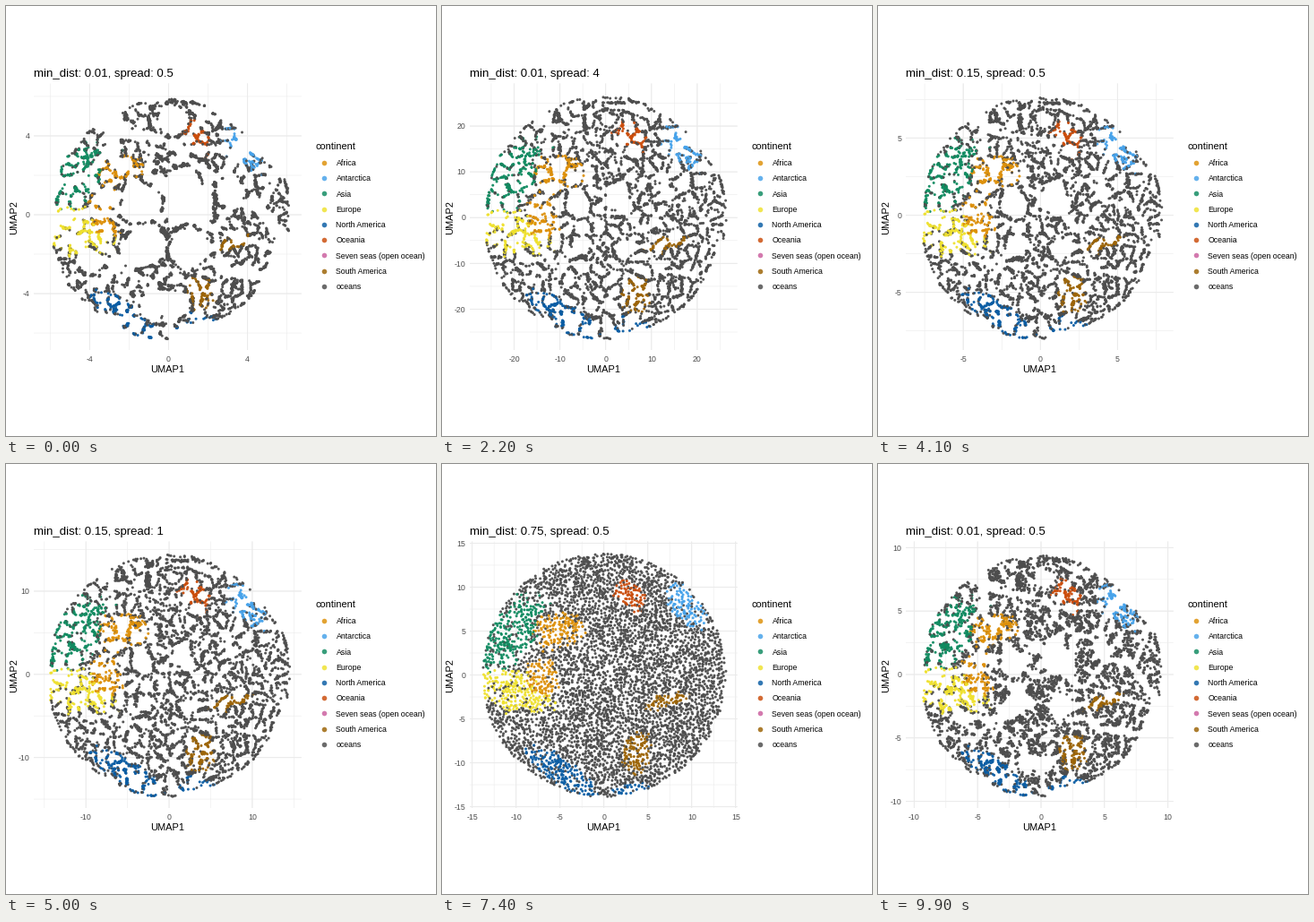
A matplotlib script that plays this animation: 480x480 px, repeating every 10 s.

```python
import numpy as np
import matplotlib.pyplot as plt
from matplotlib.animation import FuncAnimation
from matplotlib.collections import LineCollection

SIZE, DPI = 480, 100
PX = 72 / DPI
LEFT, RIGHT, TOP, BOTTOM = 31, 329.8, 86.5, 384
MID = np.array([180.2, 235.2])
DISC, RADIUS = np.array([181, 235.5]), 136
COUNT, N = 5600, 300
GRAY, GRID = "#4d4d4d", "#ebebeb"
rng = np.random.default_rng(11)
plt.rcParams["font.family"] = "Liberation Sans"

COLORS = {
    "Africa": "#dd900a", "Antarctica": "#46a2ea", "Asia": "#118b61",
    "Europe": "#efe12f", "North America": "#0a5da4", "Oceania": "#cb4d0c",
    "Seven seas (open ocean)": "#cb5f9f", "South America": "#9c6406",
    "oceans": GRAY,
}
# Each land region: x, y, half length, half width, tilt
LAND = [
    ("Asia", 76, 192, 52, 23, -55), ("Europe", 82, 253, 42, 22, 12),
    ("Africa", 131, 187, 29, 19, -10), ("Africa", 112, 238, 18, 20, 0),
    ("Antarctica", 272, 158, 30, 15, 50), ("Oceania", 209, 146, 20, 13, 40),
    ("North America", 135, 345, 44, 14, 35),
    ("North America", 210, 363, 20, 6, -10),
    ("South America", 217, 322, 15, 22, 10),
    ("South America", 250, 264, 26, 7, -15),
]
# Gaps that open as the layout tightens: x, y, radius
GAPS = [(195, 215, 24), (150, 222, 19), (155, 268, 15), (208, 270, 16),
        (165, 335, 13), (187, 335, 12), (185, 127, 12), (250, 207, 10),
        (95, 285, 9), (112, 214, 9)]
# min_dist, spread, half range of the view, pixel shift of the data origin
STATES = [
    (0.01, 0.5, 6.77, (1.3, -2.2)), (0.01, 1, 11.25, (-1.9, 2.3)),
    (0.01, 4, 31.4, (2.7, 1)), (0.15, 0.5, 6.9, (1.1, -1.7)),
    (0.15, 1, 10.4, (1.1, -1.7)), (0.15, 4, 33, (2.6, 0.8)),
    (0.75, 0.5, 12.6, (0.5, 0.3)), (0.75, 1, 17.8, (0.5, 0.3)),
    (0.75, 4, 36.8, (2.4, 2.3)),
]
PULL = {0.01: 0.92, 0.15: 0.72, 0.75: 0.15}


def random_disc(n):
    r, t = RADIUS * np.sqrt(rng.random(n)), rng.uniform(0, 2 * np.pi, n)
    return np.c_[r * np.cos(t), r * np.sin(t)]


def keep_inside(p):
    r = np.hypot(*p.T)[:, None]
    return p * np.minimum(1, RADIUS / np.maximum(r, 1))


def blur(grid, sigma):
    fy, fx = np.fft.fftfreq(N)[:, None], np.fft.rfftfreq(N)[None]
    kernel = np.exp(-2 * (np.pi * sigma) ** 2 * (fx**2 + fy**2))
    return np.maximum(np.fft.irfft2(np.fft.rfft2(grid) * kernel, s=(N, N)), 0)


def flow(p, sigma, step, count):
    """Move points up (step > 0) or down the slope of their own density."""
    axis = np.arange(N) - N / 2 + 0.5
    disc = (np.hypot(axis[:, None], axis[None]) < RADIUS).astype(float)
    wall = blur(disc, sigma) + 0.02
    for _ in range(count):
        ix, iy = np.clip((p + N / 2).astype(int), 0, N - 1).T
        hits = np.bincount(iy * N + ix, minlength=N * N).reshape(N, N)
        gy, gx = np.gradient(np.log(blur(hits, sigma) / wall + 1e-3))
        move = step * sigma**2 * np.c_[gx[iy, ix], gy[iy, ix]]
        p = keep_inside(p + np.clip(move, -2, 2))
    return p


def nearest(p, seeds):
    """Squared distances and the two closest seeds of each point."""
    d = ((p[:, None] - seeds[None]) ** 2).sum(2)
    return d, np.argsort(d, axis=1)[:, :2].T


def net(p, seeds, pull):
    """Draw points towards the borders of the cells around the seeds."""
    d, (i, j) = nearest(p, seeds)
    rows = np.arange(len(p))
    across = seeds[j] - seeds[i]
    share = (d[rows, j] - d[rows, i]) / (2 * (across**2).sum(1))
    return p + (pull * share)[:, None] * across


def open_gaps(p, amount):
    for x, y, r in GAPS:
        r *= amount
        away = p - (np.array([x, y]) - DISC)
        d = np.maximum(np.hypot(*away.T), 0.1)
        push = np.maximum(r - d / 2, 0)
        p = p + away * (push / d)[:, None]
    return p


def region_colors(p):
    tint = np.full(len(p), GRAY)
    for name, x, y, a, b, tilt in LAND:
        k = np.radians(tilt)
        dx, dy = (p + DISC - (x, y)).T
        u, v = dx * np.cos(k) + dy * np.sin(k), dy * np.cos(k) - dx * np.sin(k)
        reach = np.hypot(u / a, v / b) + rng.normal(0, 0.12, len(p))
        tint[(reach < 1) & (rng.random(len(p)) < 0.85)] = COLORS[name]
    return tint


def layout(min_dist, spread):
    pull = PULL[min_dist]
    tight = pull**2 / spread**0.4
    p = net(base, cells, pull * firmness)
    p = p + 0.22 * tight * (islands[home] - base)
    p = open_gaps(p, tight)
    p = flow(keep_inside(p), 2.6, 0.2, int(7 * tight))
    return p + DISC + rng.normal(0, 0.5, p.shape)


base = flow(random_disc(COUNT), 2, -0.2, 4)
tint = region_colors(base)
firmness = rng.uniform(0.6, 1.05, COUNT)
cells = random_disc(270)
# Mirrored seeds put cell borders along the rim
radius = np.hypot(*cells.T)[:, None]
cells = np.r_[cells, (cells * (2 * RADIUS / radius - 1))[radius[:, 0] > 110]]
islands = random_disc(50)
home = nearest(base, islands)[1][0]
LAYOUTS = [layout(d, s) for d, s, *_ in STATES]

fig = plt.figure(figsize=(SIZE / DPI, SIZE / DPI), dpi=DPI, facecolor="white")
ax = fig.add_axes([0, 0, 1, 1])
ax.set(xlim=(0, SIZE), ylim=(SIZE, 0))
ax.axis("off")


def text(x, y, s, px, color="black", **kw):
    return ax.text(x, y, s, fontsize=px * PX, color=color, **kw)


def grid_lines(width):
    return ax.add_collection(LineCollection(
        [], colors=GRID, linewidths=width * PX, snap=False))


minor, major = grid_lines(0.55), grid_lines(1.07)
dots = ax.scatter(*LAYOUTS[0].T, s=(3 * PX) ** 2, c=tint, alpha=0.95,
                  linewidths=0, zorder=3)
title = text(31, 79, "", 13.2)
text(MID[0], 409, "UMAP1", 11, ha="center")
text(9.5, 236, "UMAP2", 11, rotation=90, ha="center", va="center")
text(346, 160, "continent", 11)
for i, (name, color) in enumerate(COLORS.items()):
    y = 174.8 + 17.28 * i
    ax.scatter(354.5, y, s=(5.6 * PX) ** 2, c=color, alpha=0.83, linewidths=0)
    text(368.5, y + 3.2, name, 8.8)
x_labels = [text(0, 397, "", 8.8, GRAY, ha="center") for _ in range(9)]
y_labels = [text(26.3, 0, "", 8.8, GRAY, ha="right") for _ in range(9)]


def pose(frame):
    """Previous state, next state and progress between them."""
    for i in range(len(STATES)):
        start = 3 + 11 * i + min(i, 2)
        steps = 9 if i < 2 else 8
        if frame < start:
            return i, i, 0
        if frame < start + steps:
            return i, (i + 1) % len(STATES), (frame - start + 1) / steps


def tick_step(reach):
    for limit, step in ((7.5, 4), (15.8, 5), (34, 10)):
        if reach < limit:
            return step
    return 20


def ticks(origin, scale, step, low, high):
    values = step * np.arange(-12, 13)
    spots = origin + values * scale
    return [(v, s) for v, s in zip(values, spots) if low <= s <= high]


def grid(origin, scale, step):
    xs = ticks(origin[0], scale, step, LEFT, RIGHT)
    ys = ticks(origin[1], -scale, step, TOP, BOTTOM)
    lines = [[(x, TOP), (x, BOTTOM)] for _, x in xs]
    lines += [[(LEFT, y), (RIGHT, y)] for _, y in ys]
    return xs, ys, lines


def draw(frame):
    a, b, u = pose(frame)
    (*_, reach_a, shift_a), (*_, reach_b, shift_b) = STATES[a], STATES[b]
    reach = (1 - u) * reach_a + u * reach_b
    w = u * reach_b / reach
    dots.set_offsets((1 - w) * LAYOUTS[a] + w * LAYOUTS[b])
    origin = MID + (1 - w) * np.array(shift_a) + w * np.array(shift_b)
    scale, step = 149 / reach, tick_step(reach)
    xs, ys, lines = grid(origin, scale, step)
    major.set_segments(lines)
    minor.set_segments(grid(origin, scale, step / 2)[2])
    for label in x_labels + y_labels:
        label.set_text("")
    for label, (v, x) in zip(x_labels, xs):
        label.set(text=str(v), x=x)
    for label, (v, y) in zip(y_labels, ys):
        label.set(text=str(v), y=y + 3.2)
    min_dist, spread = STATES[b if u > 0.5 else a][:2]
    title.set_text(f"min_dist: {min_dist}, spread: {spread}")
    return [dots, major, minor, title, *x_labels, *y_labels]


anim = FuncAnimation(fig, draw, frames=100, interval=100, repeat=True,
                     repeat_delay=0, blit=False)
plt.show()
```
